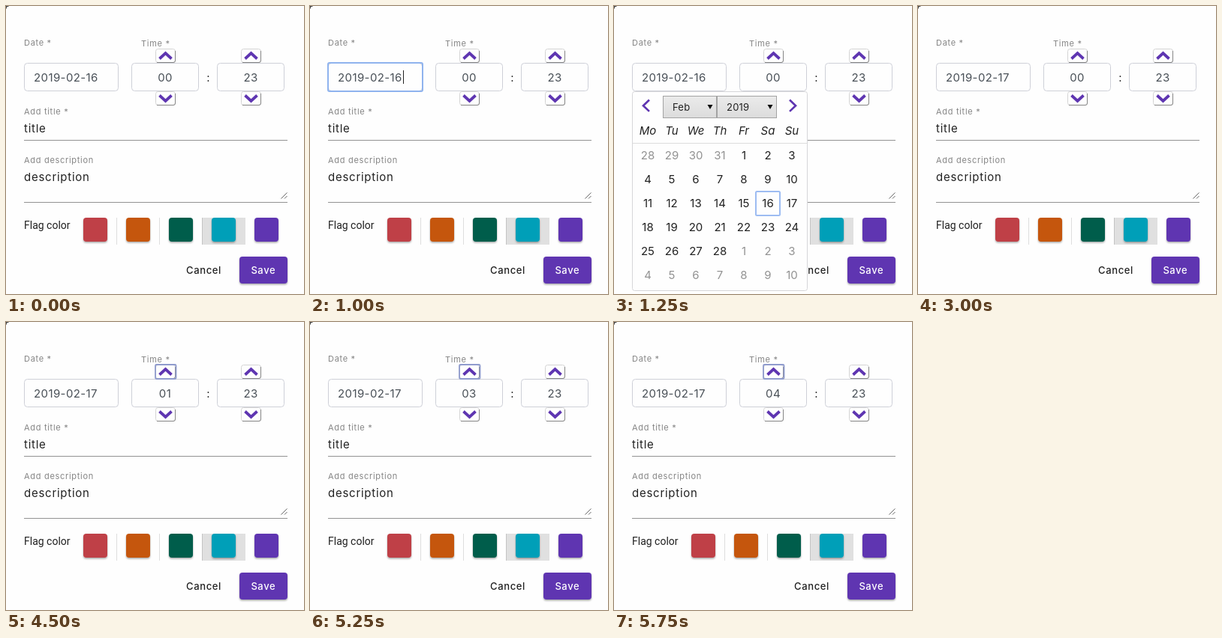
An HTML page for the animation above (7500 ms loop, 397 by 385 pixels).

```html
<!DOCTYPE html>
<html lang="en">
<head>
<meta charset="utf-8">
<title>Event form</title>
<style>
html, body { margin: 0; width: 100%; height: 100%; overflow: hidden; background: #fefefe; }
svg { display: block; }
text { font-family: Inter, "Open Sans", sans-serif; font-size: 15px; fill: #212121; white-space: pre; }
.label { font-size: 11px; letter-spacing: .7px; fill: #858585; }
.field { letter-spacing: .75px; }
.value { letter-spacing: .4px; fill: #495057; }
.mid { text-anchor: middle; }
.flag { font-family: Roboto, sans-serif; font-size: 14px; }
.button { font-size: 13px; font-weight: 500; letter-spacing: .6px; }
.select { font-size: 13px; letter-spacing: .2px; }
.head { font-style: italic; }
.muted { fill: #929292; }
.light { fill: #fff; }
</style>
</head>
<body>
<svg id="stage" width="397" height="385" viewBox="0 0 397 385">
  <defs>
    <linearGradient id="grey" x2="0" y2="1">
      <stop stop-color="#ebebeb"/><stop offset="1" stop-color="#dcdcdc"/>
    </linearGradient>
    <filter id="drop" x="-20%" y="-20%" width="140%" height="150%">
      <feDropShadow dx="0" dy="1.5" stdDeviation="1.2" flood-opacity=".35"/>
    </filter>
  </defs>
</svg>
<script>
const PURPLE = '#5e35b1', RING = '#8fb3ee';
const stage = document.getElementById('stage');

function add(parent, tag, attrs, content) {
  const el = document.createElementNS('http://www.w3.org/2000/svg', tag);
  for (const key in attrs) el.setAttribute(key, attrs[key]);
  if (content !== undefined) el.textContent = content;
  return parent.appendChild(el);
}
const text = (p, x, y, cls, str) => add(p, 'text', { x, y, class: cls }, str);
const rect = (p, x, y, width, height, fill, more) =>
  add(p, 'rect', { x, y, width, height, fill, ...more });
const line = (p, d, stroke, width = 1) =>
  add(p, 'path', { d, stroke, 'stroke-width': width, fill: 'none' });
const group = p => add(p, 'g', {});

function input(x, width) {
  rect(stage, x + .5, 76.5, width - 1, 37, '#fefefe', { rx: 4, stroke: '#ced0d8' });
}

function stepper(x, y, dir) {
  rect(stage, x - 12.5, y - 9, 26, 18, '#fefefe', { rx: 3, stroke: '#d4d4d4' });
  line(stage, `M${x - 11} ${y + 9}h22q2.5 0 2.5 -2.5v-13`, '#858585');
  line(stage, `M${x - 7.5} ${y + 4 * dir}l8 ${-7.5 * dir}l8 ${7.5 * dir}`, PURPLE, 3.8);
}

// form
line(stage, 'M0 3.5V0H3.5Q0 0 0 3.5Z', '#444').setAttribute('fill', '#222');
text(stage, 24, 53, 'label', 'Date *');
text(stage, 180, 54, 'label', 'Time *');
input(24, 126);
input(167, 90);
input(281, 90);
for (const x of [212, 326]) {
  stepper(x, 66.5, 1);
  stepper(x, 123.5, -1);
}
const date = text(stage, 37, 100.5, 'value', '');
const hour = text(stage, 212, 100.5, 'value mid', '');
text(stage, 326, 100.5, 'value mid', '23');
text(stage, 269.5, 101, 'mid', ':');

text(stage, 24, 145, 'label', 'Add title *');
text(stage, 24, 169, 'field', 'title');
line(stage, 'M24 179.5H375', '#929292');
text(stage, 24, 210, 'label', 'Add description');
text(stage, 24, 234, 'field', 'description');
line(stage, 'M24 262.5H375', '#929292');
line(stage, 'M366.5 257.5l8 -8M371 257.5l3.5 -3.5', '#666');

text(stage, 24, 298, 'flag', 'Flag color');
rect(stage, 262, 283, 57, 36, '#e0e0e0');
line(stage, 'M147.5 283v36M204.5 283v36', '#dedede');
line(stage, 'M261.5 283v36', '#c4c4c4');
['#bf4046', '#c5560a', '#045d4c', '#009fb8', PURPLE].forEach((fill, i) =>
  rect(stage, 103 + 57 * i, 283, 32, 32, fill, { rx: 4, filter: 'url(#drop)' }));

text(stage, 263.5, 358, 'button mid', 'Cancel');
rect(stage, 311, 335, 64, 36, PURPLE, { rx: 4, filter: 'url(#drop)' });
text(stage, 342.8, 358, 'button mid light', 'Save');

// focus marks
const dateFocus = group(stage);
rect(dateFocus, 24, 76, 126, 38, 'none', { rx: 2, stroke: RING, 'stroke-width': 2 });
line(dateFocus, 'M124.5 86v18', '#222');
const hourFocus = group(stage);
rect(hourFocus, 199, 57, 27.5, 19, 'none', { rx: 1.5, stroke: '#8f9bcd', 'stroke-width': 1.8 });

// calendar
const calendar = group(stage);
rect(calendar, 24.5, 114.5, 233, 266, '#fefefe', { rx: 3, stroke: '#d6d6d9' });
line(calendar, 'M47 125.5l-8 7.7l8 7.7', PURPLE, 2.7);
line(calendar, 'M234 125.5l8 7.7l-8 7.7', PURPLE, 2.7);
[[65, 72, 'Feb'], [137, 80, '2019']].forEach(([x, w, str]) => {
  rect(calendar, x + .5, 120.5, w - 1, 29, 'url(#grey)', { stroke: '#a3a3a3' });
  text(calendar, x + 13, 140, 'select', str);
  add(calendar, 'path', { d: `M${x + w - 12.5} 132h7l-3.5 6z`, fill: '#111' });
});
const column = i => 45 + 32 * i;
['Mo', 'Tu', 'We', 'Th', 'Fr', 'Sa', 'Su'].forEach((day, i) =>
  text(calendar, column(i), 172, 'head mid', day));
line(calendar, 'M25 183.5H257', '#dcdcdc');
rect(calendar, 189, 248, 32, 32, 'none', { rx: 1.5, stroke: '#9dbcf2', 'stroke-width': 2 });
const first = new Date(2019, 0, 28);
for (let i = 0; i < 42; i++) {
  const day = new Date(2019, 0, first.getDate() + i);
  text(calendar, column(i % 7), 205.3 + 32 * Math.floor(i / 7),
    day.getMonth() === 1 ? 'mid' : 'mid muted', day.getDate());
}

// start, date, hour, focus
const LOOP = 7500;
const steps = [
  [0, '2019-02-16', '00', ''],
  [1000, '2019-02-16', '00', 'date'],
  [1250, '2019-02-16', '00', 'calendar'],
  [3000, '2019-02-17', '00', ''],
  [4500, '2019-02-17', '01', 'hour'],
  [5000, '2019-02-17', '02', 'hour'],
  [5250, '2019-02-17', '03', 'hour'],
  [5750, '2019-02-17', '04', 'hour']
];
const layers = { date: dateFocus, calendar, hour: hourFocus };
let shown;

function render(time) {
  const t = time % LOOP;
  const step = steps.filter(s => s[0] <= t).pop();
  if (step === shown) return;
  shown = step;
  date.textContent = step[1];
  hour.textContent = step[2];
  for (const name in layers)
    layers[name].setAttribute('visibility', name === step[3] ? 'visible' : 'hidden');
}

const start = performance.now();
function tick() {
  render(Math.max(0, performance.now() - start));
  requestAnimationFrame(tick);
}
tick();
</script>
</body>
</html>
```
